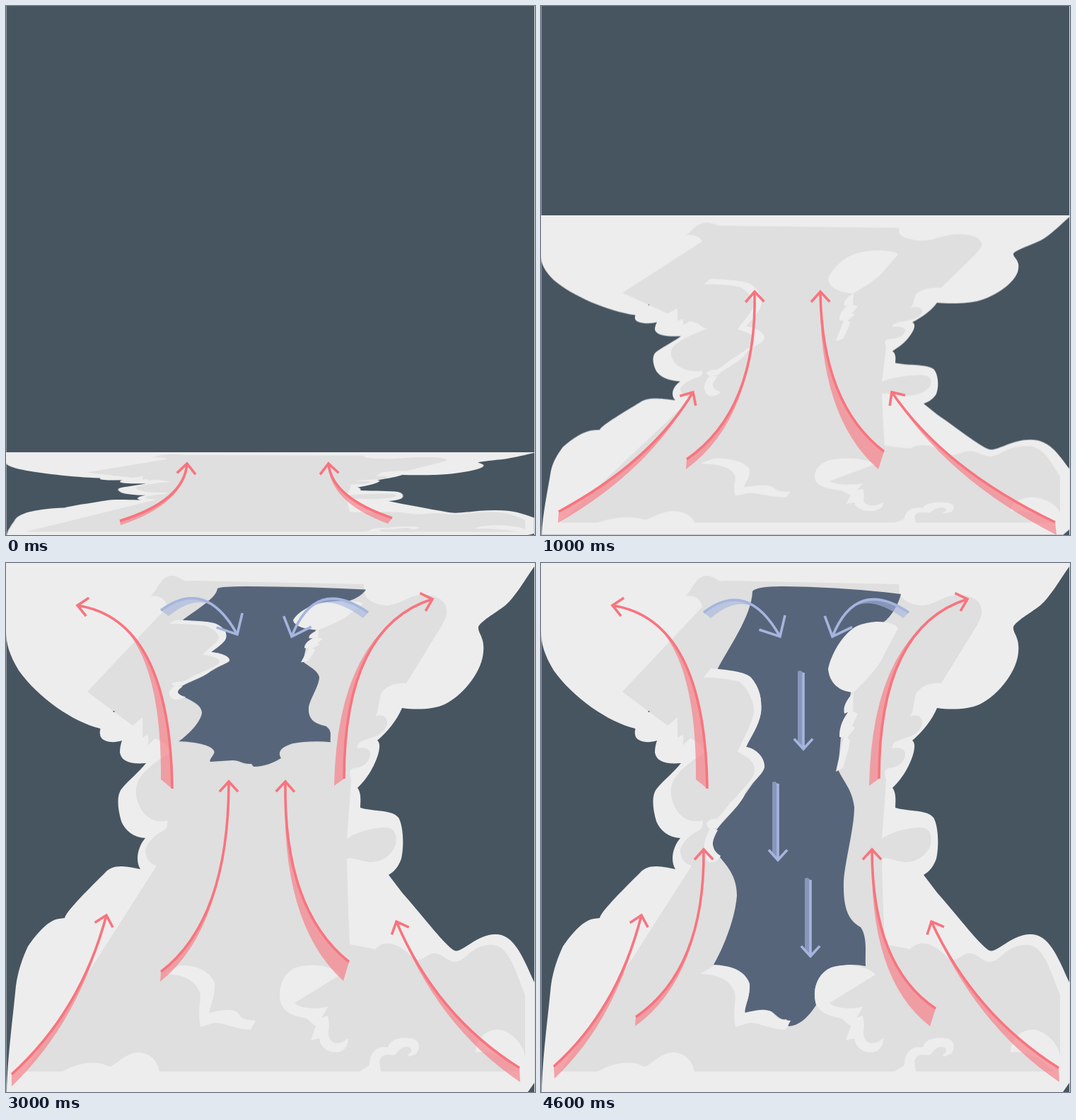
Recreate the animation shown at these times as an HTML page. Size 748 by 748 pixels, loop 5 s.

```html
<!DOCTYPE html>
<html lang="en">
<head>
<meta charset="utf-8">
<title>Storm cloud life cycle</title>
<style>
  html, body { margin: 0; width: 100%; height: 100%; overflow: hidden; background: #fff; }
  svg { display: block; width: 100%; height: 100%; }
  .light { fill: #ededed; }
  .grey { fill: #dfdfdf; }
  .red { --ink: #f8747e; }
  .blue { --ink: #a5b5de; }
  .line { fill: none; stroke: var(--ink); stroke-width: 3.6; }
  .wedge { fill: var(--ink); opacity: .62; }

  .grow, .upper, .late, .hole, .scene { animation: 5s step-end infinite; transform-origin: 0 0; }
  .grow { animation-name: grow; }
  .upper { animation-name: upper; }
  .late { animation-name: late; }
  .hole { animation-name: hole; }
  .scene { animation-name: show; animation-delay: calc((var(--i) - 5) * 1s); }

  @keyframes grow {
    0% { transform: translateY(631px) scaleY(.1564); }
    20% { transform: translateY(295.5px) scaleY(.605); }
    40%, 100% { transform: none; }
  }
  @keyframes upper {
    0% { visibility: hidden; }
    20% { visibility: visible; transform: translateY(295.5px) scaleY(.605); }
    40% { visibility: visible; transform: none; }
    60% { visibility: visible; transform: translateY(19.5px) scaleY(.41); }
    80%, 100% { visibility: visible; transform: none; }
  }
  @keyframes late { 0% { visibility: hidden; } 20%, 100% { visibility: visible; } }
  @keyframes hole { 0% { visibility: hidden; } 60%, 100% { visibility: visible; } }
  @keyframes show { 0% { visibility: visible; } 20%, 100% { visibility: hidden; } }
</style>
</head>
<body>
<svg id="stage" viewBox="0 0 748 748">
  <rect x=".4" width="746.8" height="748" fill="#475561"/>

  <g class="grow">
    <path class="light" d="M0 0H747V5C735 22 720 48 706 60C690 72 672 82 668 90C667 100 677 104 675 125
      C674 150 650 185 620 200C605 207 580 208 560 205C553 222 540 238 525 251C532 256 526 275 518 290
      C512 302 503 312 497 318C503 326 501 338 501 346C520 352 545 348 555 360C562 372 563 400 559 418
      C555 430 548 437 541 441L560 466C590 500 620 540 634 548C645 552 665 525 692 525C718 525 730 555 747 593
      V735L738 748H1C2 700 10 640 14 598C17 575 25 555 31 542C45 522 60 505 75 503L83 502
      C85 492 120 458 140 438C150 427 162 427 190 433C182 420 187 400 197 389C180 388 168 378 163 365
      C157 345 157 328 163 320C172 308 188 296 198 283C175 285 163 280 161 268C161 258 164 252 164 251
      C150 256 133 252 133 242C132 238 134 236 133 234C95 225 45 190 18 152C5 130 0 115 0 95Z"/>
    <path class="grey" d="M204 47C215 38 218 18 235 18C247 19 250 28 260 25L506 30C507 35 506 40 507 43
      C510 55 530 60 540 60C560 58 570 45 590 45C612 45 625 56 623 72C621 82 614 92 608 102L566 170
      C548 168 530 178 529 190C526 205 526 212 522 217C535 212 540 220 539 228C533 245 520 245 505 251
      C498 254 496 258 497 262C505 260 515 262 515 270C514 285 500 290 492 290C484 292 486 300 488 306
      C487 320 486 340 485 350L482 390C495 380 520 374 538 374C553 376 552 388 551 398
      C545 415 530 423 515 423C500 422 490 415 482 418C483 455 484 500 486 539L522 546
      C535 532 555 537 575 558C585 565 590 558 600 553C612 548 620 560 632 564C650 566 655 540 686 540
      C710 540 718 570 734 611V719H27L213 428C200 424 197 415 197 405C200 395 210 385 220 380
      C226 378 230 372 228 364C215 368 200 362 192 350C180 330 182 312 192 300C205 285 220 275 235 266
      C227 262 225 258 223 254L211 248L200 258Q203 248 200 243L193 247V218L179 230L115 182L228 62
      C226 50 215 45 204 47Z"/>
    <circle cx="152.500" cy="210" r="1" fill="#475561"/>
    <path class="light" d="M664 692C665 665 690 655 705 662C720 668 734 685 734 700V719H725
      C715 710 708 700 695 697C685 692 672 690 664 692Z"/>
    <path class="light" d="M500 719C510 712 515 712 514 706C516 690 525 682 540 685C542 675 555 670 570 672
      C585 672 587 685 580 694C572 697 570 700 568 695C578 690 572 684 565 684C555 686 552 696 548 696
      C538 694 530 695 528 705L530 719Z"/>
    <path class="light late" d="M80 719C100 708 115 706 128 707C138 707 142 712 148 712C160 705 172 692 188 692
      C205 693 215 706 217 719Z"/>
  </g>

  <g class="upper">
    <path class="hole" fill="#57657b" d="M249 151C265 120 298 75 299 40Q305 33 340 33Q430 34 509 44
      C505 60 495 76 484 84L450 100L438 183L434 213L424 246L420 292C428 310 440 320 443 345
      C443 375 430 420 428 450C427 490 435 505 452 515C462 530 458 550 459 570C440 566 420 568 405 575
      C385 590 385 610 389 625C380 640 365 655 350 655L347 645C335 648 330 632 320 633L289 638
      C286 630 297 610 294 600C290 580 265 568 244 568C260 540 275 500 277 470C277 445 265 430 252 415
      C243 405 242 400 243 385C255 365 276 350 288 328L300 311C310 300 315 294 316 288C316 275 305 263 290 260
      C297 245 308 230 311 212C313 190 308 175 297 162Q285 154 249 151Z"/>
    <path class="light" d="M230 162L240 149C265 151 290 154 297 162C308 175 313 190 311 212
      C308 230 297 245 290 260C305 263 316 275 316 288C315 300 290 314 288 328C276 350 262 356 250 374
      L238 376Q234 372 234 368Q240 360 248 362C262 350 264 340 276 331C286 318 302 305 302 293
      C302 280 293 275 278 267C285 250 297 230 301 212C302 200 295 180 281 168Q255 161 230 162Z"/>
    <path class="light" d="M240 374C230 390 228 405 235 420C240 428 252 420 254 414C240 405 240 395 250 378Z"/>
    <path class="light" d="M505 92C500 83 470 78 445 90C425 102 410 130 406 150C408 170 422 182 442 183
      C455 170 478 148 486 128Z"/>
    <path class="light" d="M442 183C430 195 427 205 429 213L434 211C424 225 422 235 422 246L428 247
      C424 265 420 280 417 295L427 290L435 262L437 250L433 247L444 233L440 230L448 213L441 210Z"/>
  </g>

  <g class="grow">
    <g class="light late">
      <path d="M225 581L245 569C270 568 290 578 295 595C296 612 290 622 287 636C300 634 315 628 327 635
        C332 642 333 646 353 647L346 660C325 660 310 650 295 650L275 656C270 630 278 615 273 605
        C265 588 250 582 225 581Z"/>
      <path d="M473 582C460 568 430 566 410 572C392 580 384 600 388 620C392 635 405 640 425 644L438 655
        L431 675L443 672C445 690 465 695 475 690C482 685 484 680 484 672C470 684 455 680 456 662
        C458 655 456 645 455 640L446 643Q452 635 455 627C440 632 415 630 408 622Z"/>
    </g>
  </g>
</svg>

<script>
const stage = document.getElementById('stage');

function add(parent, tag, attrs) {
  const el = document.createElementNS('http://www.w3.org/2000/svg', tag);
  for (const key in attrs) el.setAttribute(key, attrs[key]);
  return parent.appendChild(el);
}

// Chevron at the tip, opening against the direction of travel.
function head(x, y, angle, size) {
  const barb = side => {
    const a = angle + Math.PI + side * 0.74;
    return `${x + size * Math.cos(a)} ${y + size * Math.sin(a)}`;
  };
  return `M${barb(1)}L${x} ${y}L${barb(-1)}`;
}

// Start, control point, tip, and the offset of the wedge at the start.
function curved(scene, color, [sx, sy, cx, cy, tx, ty, dx, dy]) {
  const g = add(scene, 'g', { class: color });
  const curve = `M${sx} ${sy}Q${cx} ${cy} ${tx} ${ty}`;
  const size = color === 'blue' ? 31 : 19.5;
  add(g, 'path', { class: 'wedge', d: `${curve}Q${cx + dx * .7} ${cy + dy * .7} ${sx + dx} ${sy + dy}Z` });
  add(g, 'path', { class: 'line', d: curve + head(tx, ty, Math.atan2(ty - cy, tx - cx), size) });
}

function falling(scene, x, y) {
  const g = add(scene, 'g', { class: 'blue' });
  add(g, 'path', { class: 'wedge', d: `M${x} ${y}L${x - 4} ${y - 3}L${x - 8} ${y - 2}V${y + 102}L${x} ${y + 108}Z` });
  add(g, 'path', { class: 'line', d: `M${x} ${y}V${y + 108}` + head(x, y + 108, Math.PI / 2, 19.5) });
}

const outflow = [
  [235, 319, 232, 80, 101, 60, -16, -13],
  [478, 305, 478, 90, 603, 51, -14, 10]
];

const scenes = [
  { red: [
    [161, 728, 252, 700, 256, 647, 1, 6],
    [546, 724, 460, 695, 456, 647, -6, 8]
  ] },
  { red: [
    [25, 715, 155, 645, 215, 546, -1, 16],
    [206, 641, 306, 572, 302, 404, -1, 14],
    [485, 630, 397, 563, 395, 404, -8, 25],
    [727, 730, 570, 655, 496, 546, 2, 18]
  ] },
  { red: [
    [91, 651, 190, 570, 238, 427, -8, 25],
    [215, 581, 312, 508, 312, 312, 0, 15],
    [482, 568, 389, 495, 392, 312, -9, 28],
    [629, 644, 530, 560, 473, 426, 1, 21],
    [259, 366, 262, 120, 149, 98, 14, 10],
    [447, 366, 446, 120, 557, 98, -13, 10]
  ] },
  { red: [
    [8, 723, 106, 634, 142, 498, 0, 17],
    [219, 578, 315, 505, 315, 309, -1, 14],
    [485, 564, 392, 490, 395, 309, -8, 27],
    [726, 714, 608, 640, 552, 507, 1, 20],
    ...outflow
  ], blue: [
    [219, 67, 282, 20, 327, 101, 11, 8],
    [512, 70, 437, 18, 404, 104, -7, 8]
  ] },
  { red: [
    [18, 712, 108, 632, 142, 498, 1, 17],
    [134, 642, 232, 575, 230, 405, -1, 13],
    [558, 630, 468, 570, 468, 405, -8, 25],
    [732, 714, 612, 638, 552, 507, 1, 20],
    ...outflow
  ], blue: [
    [230, 70, 292, 22, 338, 104, 10, 8],
    [520, 70, 446, 20, 412, 104, -8, 8]
  ], falls: [[371, 155], [335, 312], [381, 448]] }
];

scenes.forEach(({ red, blue = [], falls = [] }, i) => {
  const scene = add(stage, 'g', { class: 'scene', style: `--i:${i}` });
  red.forEach(a => curved(scene, 'red', a));
  blue.forEach(a => curved(scene, 'blue', a));
  falls.forEach(([x, y]) => falling(scene, x, y));
});
</script>
</body>
</html>
```
